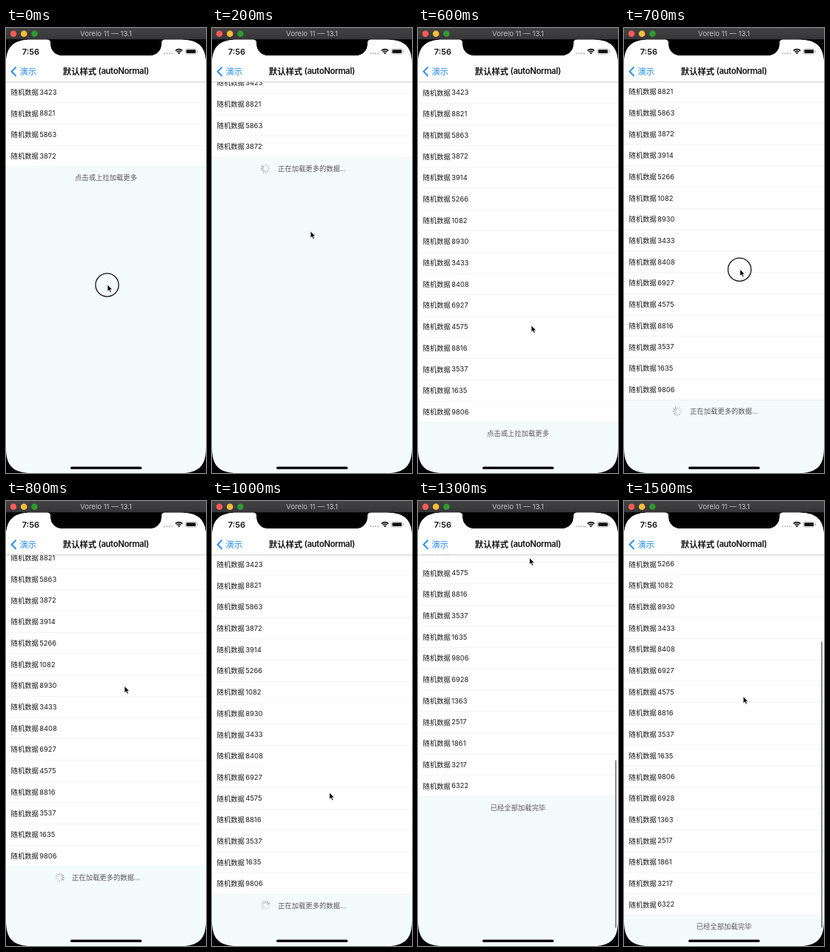
Write an HTML page that moves like this. It is 270x600 px and loops after 1.6 s.

```html
<!DOCTYPE html>
<html lang="zh-CN">
<head>
<meta charset="utf-8">
<title>autoNormal</title>
<style>
  html, body { margin: 0; width: 100%; height: 100%; overflow: hidden; background: #000; }
  svg { display: block; width: 270px; height: 600px; font: 9.33px Inter, "Noto Sans CJK SC", "Noto Sans CJK", sans-serif; }
  .row { fill: #1c1c1c; }
  .foot { fill: #555; text-anchor: middle; }
  .bold { font-weight: 600; fill: #111; }
  .blue { fill: #1f8af0; }
  .bar { font-size: 11.33px; }
</style>
</head>
<body>
<svg width="270" height="600">
  <defs>
    <clipPath id="screen">
      <path d="M0 49.6C0 25.4 9.7 15.65 34 15.65H55.5C58.5 15.65 60 17.5 60 20.5V22C60 30.6 66.9 37.3 75.5 37.3H194.5C203.1 37.3 210 30.6 210 22V20.5C210 17.5 211.5 15.65 214.5 15.65H236C260.3 15.65 270 25.4 270 49.6V566C270 590.3 260.3 600 236 600H34C9.7 600 0 590.3 0 566Z"/>
    </clipPath>
    <linearGradient id="chrome" x2="0" y2="1">
      <stop stop-color="#434345"/><stop offset="1" stop-color="#363638"/>
    </linearGradient>
  </defs>

  <rect width="270" height="600"/>
  <rect width="270" height="15.3" fill="url(#chrome)"/>
  <circle cx="10" cy="7.8" r="4.27" fill="#fc5b55"/>
  <circle cx="24.2" cy="7.8" r="4.27" fill="#f5bd3b"/>
  <circle cx="38.4" cy="7.8" r="4.27" fill="#2f9a2f"/>
  <text x="135" y="11.2" text-anchor="middle" font-size="9.6" fill="#c0c0c2">Vorelo 11 — 13.1</text>

  <g clip-path="url(#screen)">
    <rect y="15" width="270" height="585" fill="#f4fbfb"/>
    <g id="list">
      <rect id="sheet" width="270" fill="#fff"/>
      <g id="rows"></g>
      <g id="footer">
        <text id="label" class="foot" x="135" y="3.4"></text>
        <g id="spinner"></g>
      </g>
    </g>
    <rect id="thumb" x="266.1" width="1.9" rx=".95" fill="#858787"/>

    <rect y="15" width="270" height="57.7" fill="#fff"/>
    <rect y="72.5" width="270" height=".7" fill="#b4b4b6"/>
    <text class="bold" x="21.8" y="35.9" font-size="11">7:56</text>
    <g fill="#b9b9bb">
      <circle cx="214.2" cy="34.3" r="1.1"/><circle cx="217.5" cy="34.3" r="1.1"/>
      <circle cx="220.8" cy="34.3" r="1.1"/><circle cx="224.1" cy="34.3" r="1.1"/>
    </g>
    <g fill="none" stroke="#111" stroke-width="1.6">
      <path d="M228.8 30.6A6.6 6.6 0 0 1 238.2 30.6M230.6 32.4A4.1 4.1 0 0 1 236.4 32.4"/>
      <path d="M231.9 33.7A2.2 2.2 0 0 1 235.1 33.7L233.5 35.4Z" fill="#111" stroke="none"/>
      <rect x="242.2" y="28" width="15" height="7.2" rx="2.2" stroke="#999" stroke-width=".65"/>
      <rect x="243.4" y="29.2" width="12.6" height="4.8" rx="1.1" fill="#111" stroke="none"/>
      <path d="M258.5 30.5V32.7" stroke="#999" stroke-width=".9"/>
    </g>
    <path d="M13.6 52.6L7.6 58.7L13.6 64.8" fill="none" stroke="#1f8af0" stroke-width="1.9"/>
    <text class="bar blue" x="18.4" y="62.7">演示</text>
    <text class="bar bold" x="76.8" y="62.7">默认样式</text>
    <text class="bar bold" x="124.5" y="62.4" letter-spacing="-.35">(autoNormal)</text>
    <rect x="87" y="591.5" width="96.3" height="3.26" rx="1.63"/>
  </g>

  <g id="cursor">
    <circle id="ring" cx="-.5" cy=".5" r="15.6" fill="none" stroke="#111" stroke-width="1.3"/>
    <path d="M0 0V9.2L2.1 7.3L3.6 10.7L5.2 10L3.8 6.7H6.6Z" fill="#000" stroke="#fff" stroke-width=".7"/>
  </g>
</svg>
<script>
const $ = id => document.getElementById(id);
const NS = 'http://www.w3.org/2000/svg';
const add = (parent, tag, attrs, text = '') => {
  const el = document.createElementNS(NS, tag);
  for (const k in attrs) el.setAttribute(k, attrs[k]);
  el.textContent = text;
  return parent.appendChild(el);
};

const STEP = 100, STEPS = 16, TOP = 73, ROW = 28.69, MAX_OFF = 145.4;
const values = ('3423 8821 5863 3872 3914 5266 1082 8930 3433 8408 6927 ' +
  '4575 8816 3537 1635 9806 6928 1363 2517 1861 3217 6322').split(' ');

const rows = values.map((v, i) => {
  const g = add($('rows'), 'g', { transform: `translate(0 ${i * ROW})` });
  add(g, 'text', { class: 'row', x: 6.6, y: 17.6 }, '随机数据');
  add(g, 'text', { class: 'row', x: 45.3, y: 17.4 }, v);
  add(g, 'rect', { y: ROW - .5, width: 270, height: .5, fill: '#e6e8e8' });
  return g;
});

const spokes = Array.from({ length: 12 }, (_, i) => add($('spinner'), 'path', {
  d: 'M0 -3.4V-6.2', stroke: '#777', 'stroke-width': .9, 'stroke-linecap': 'round',
  transform: `translate(72.3 0) rotate(${i * 30})`
}));

// Keys: [step, ...values], linear in between
const pointer = [[0, 137, 346], [2, 133, 274], [6, 153, 401], [8, 160, 249.5],
  [10, 158.5, 393], [11, 157, 392], [13, 150.5, 76.5], [15, 161, 263.5]];
const scroll = [[0, .6], [1, 24], [2, 13.2], [3, 0], [6, 0], [7, 30], [8, 39],
  [10, 1.6], [11, 0], [13, 305.5], [14, 186], [15, 145.4]];

function at(keys, s) {
  const i = Math.max(1, keys.findIndex(k => k[0] >= s));
  const a = keys[i - 1], b = keys[i], p = (s - a[0]) / (b[0] - a[0]);
  return a.slice(1).map((v, j) => v + (b[j + 1] - v) * p);
}

const idle = '点击或上拉加载更多', busy = '正在加载更多的数据...', done = '已经全部加载完毕';
const move = (id, x, y) => $(id).setAttribute('transform', `translate(${x} ${y})`);
const show = (el, on) => el.setAttribute('visibility', on ? 'visible' : 'hidden');

function draw(s) {
  const [x, y] = at(pointer, s), [off] = at(scroll, s);
  const count = s < 5 ? 4 : s < 11 ? 16 : 22;
  const loading = (s > 0 && s < 5) || (s > 6 && s < 11);
  const height = count * ROW;

  move('cursor', x, y);
  show($('ring'), [0, 1, 7, 12].includes(s));
  move('list', 0, TOP - off);
  $('sheet').setAttribute('height', height);
  rows.forEach((r, i) => show(r, i < count));

  move('footer', 0, height + 14.8);
  $('label').textContent = s > 10 ? done : loading ? busy : idle;
  show($('spinner'), loading);
  spokes.forEach((p, i) =>
    p.setAttribute('opacity', Math.max(.3, 1 - .1 * ((s * 5 - i + 60) % 12))));

  const over = Math.max(0, off - MAX_OFF), len = 386 - over;
  show($('thumb'), s > 11);
  $('thumb').setAttribute('height', len);
  $('thumb').setAttribute('y', over ? 575.5 - len : 80 + off / MAX_OFF * 109.5);
}

let last = -1;
function tick() {
  const s = Math.floor(performance.now() / STEP) % STEPS;
  if (s !== last) draw(last = s);
  requestAnimationFrame(tick);
}
tick();
</script>
</body>
</html>
```
